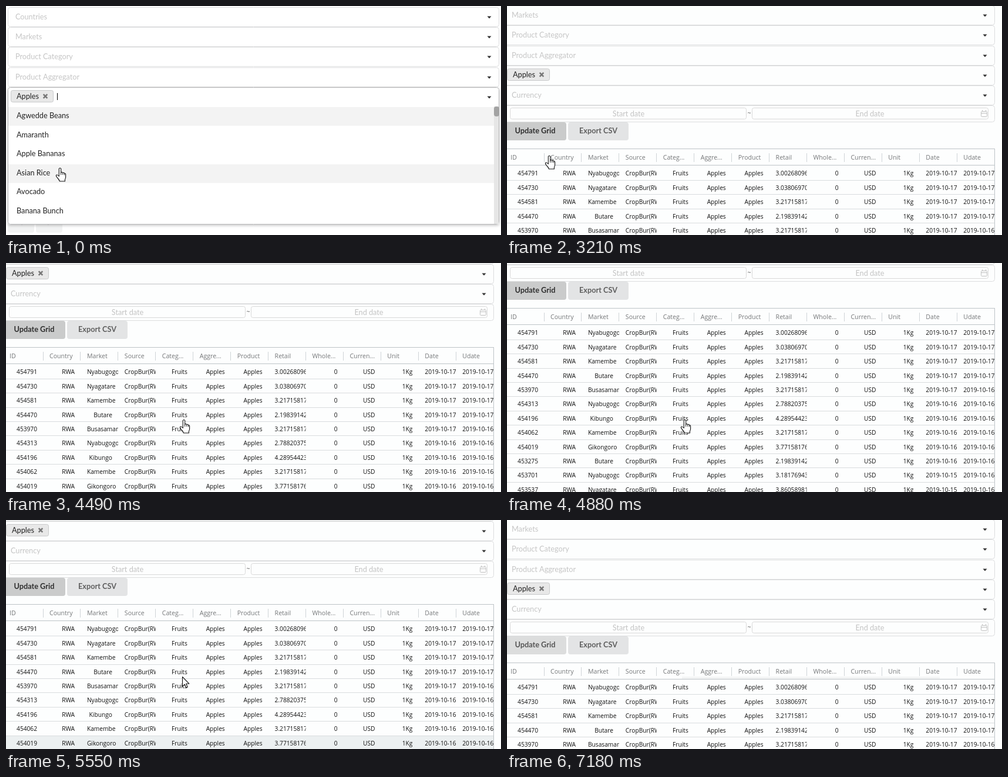
These frames come from a looping animation (843 px wide and 392 px high, 7280 ms). An HTML page with a canvas:

```html
<!DOCTYPE html>
<html lang="en">
<head>
<meta charset="utf-8">
<title>Price grid</title>
<style>
  html, body { margin: 0; width: 100%; height: 100%; overflow: hidden; background: #fff; }
  canvas { display: block; }
</style>
</head>
<body>
<canvas id="stage" width="843" height="392"></canvas>
<script>
const ctx = document.getElementById('stage').getContext('2d');
const LOOP = 7280;
const OPEN_END = 1080, LOADED = 3210;

const TICKS = [0, 150, 300, 420, 540, 660, 800, 920, 1080, 1200, 1320, 1460, 1580, 1700,
  3210, 3330, 3450, 3600, 3720, 3840, 3960, 4080, 4360, 4490, 4760, 4880, 5030,
  5310, 5430, 5550, 5830, 5980, 6380, 6530, 6650, 6770, 7180];

const POINTER = [[0, 92, 277], [150, 91, 276], [660, 234, 378], [920, 224, 377], [1080, 220, 377],
  [1320, 146, 330], [1700, 62, 255], [3209, 62, 255], [3210, 72, 256], [3450, 79, 256],
  [4080, 303, 268], [5030, 303, 268], [5310, 300, 268], [5980, 300, 268], [6380, 303, 268]];
const SCROLL = [[4240, 0], [4490, 100], [4640, 100], [5030, 200],
  [5310, 200], [5550, 100], [5700, 100], [5980, 0]];

const LATO = '12.7px Lato, sans-serif';
const LATO_BOLD = 'bold 12.7px Lato, sans-serif';
const CELL = '10.2px "Open Sans", sans-serif';
const HEAD = '10.6px "Open Sans", sans-serif';

const FIELDS = ['Countries', 'Markets', 'Product Category', 'Product Aggregator', '', 'Currency'];
const OPTIONS = ['Agwedde Beans', 'Amaranth', 'Apple Bananas', 'Asian Rice', 'Avocado', 'Banana Bunch'];
const COLUMNS = ['ID', 'Country', 'Market', 'Source', 'Categ...', 'Aggre...', 'Product',
  'Retail', 'Whole...', 'Curren...', 'Unit', 'Date', 'Udate'];
// id, market, retail price, day of date, day of update
const ROWS = [
  ['454791', 'Nyabugogo', '3.00268096', 17, 17],
  ['454730', 'Nyagatare', '3.03806970', 17, 17],
  ['454581', 'Kamembe', '3.21715817', 17, 17],
  ['454470', 'Butare', '2.19839142', 17, 17],
  ['453970', 'Busasamana', '3.21715817', 17, 16],
  ['454313', 'Nyabugogo', '2.78820375', 16, 16],
  ['454196', 'Kibungo', '4.28954423', 16, 16],
  ['454062', 'Kamembe', '3.21715817', 16, 16],
  ['454019', 'Gikongoro', '3.77158176', 16, 16],
  ['453275', 'Butare', '2.19839142', 16, 16],
  ['453701', 'Nyabugogo', '3.18176943', 15, 16],
  ['453537', 'Nyagatare', '3.86058981', 15, 16],
  ['453462', 'Kamembe', '3.21715817', 15, 16]
];
const ROWS_TOP = 311.4, ROW_HEIGHT = 24.4;

const HAND = new Path2D('M-1.7 14.5V1.6Q0 -1 1.7 1.6V8Q3.6 6.6 4.8 8.6Q6.8 7.6 7.6 9.6' +
  'Q9.6 9.2 9.6 11.6V16Q9.4 18.6 8.4 20V23H-.6Q-1.6 20 -4.6 17Q-8 13 -5.8 12Q-4.2 11.6 -1.7 14.5Z');
const HAND_FOLDS = new Path2D('M1.7 8V12M4.8 8.8V12M7.6 10V12.5');
const ARROW = new Path2D('M.5 .5V17L4.3 13.3L6.6 19L9.2 18L6.8 12.2H11.8Z');

function valueAt(keys, t) {
  if (t <= keys[0][0]) return keys[0].slice(1);
  for (let i = 1; i < keys.length; i++) {
    const [a, b] = [keys[i - 1], keys[i]];
    if (t > b[0]) continue;
    const u = (t - a[0]) / (b[0] - a[0]), ease = u * u * (3 - 2 * u);
    return a.slice(1).map((v, k) => Math.round(v + (b[k + 1] - v) * ease));
  }
  return keys[keys.length - 1].slice(1);
}

function rect(x, y, w, h, color) {
  ctx.fillStyle = color;
  ctx.fillRect(x, y, w, h);
}

function box(left, top, right, bottom, radius, fill, stroke) {
  ctx.beginPath();
  const inset = stroke ? 0.5 : 0;
  ctx.roundRect(left + inset, top + inset, right - left - 2 * inset, bottom - top - 2 * inset, radius);
  if (fill) { ctx.fillStyle = fill; ctx.fill(); }
  if (stroke) { ctx.strokeStyle = stroke; ctx.lineWidth = 1; ctx.stroke(); }
}

function text(str, x, y, font, color, align = 'left') {
  ctx.font = font;
  ctx.fillStyle = color;
  ctx.textAlign = align;
  ctx.fillText(str, x, y);
}

function strokePath(path, color, width) {
  ctx.strokeStyle = color;
  ctx.lineWidth = width;
  ctx.stroke(path);
}

function caretDown(x, y) {
  ctx.fillStyle = '#333';
  ctx.fill(new Path2D(`M${x - 3.5} ${y - 2}H${x + 3.5}L${x} ${y + 2}Z`));
}

function drawTag() {
  box(8, 144, 81, 165, 3, '#e8e8e8', '#c9cacb');
  text('Apples', 18, 159, LATO, '#222');
  strokePath(new Path2D('M63.7 151.2L70.3 157.8M70.3 151.2L63.7 157.8'), '#777', 2.5);
}

function drawFields(right) {
  FIELDS.forEach((label, i) => {
    const y = Math.round(2 + 34.2 * i);
    box(3, y, right, y + 34, 4, null, '#dcddde');
    text(label, 16, y + 21, LATO, '#c6c6c6');
    caretDown(right - 17, y + 17.5);
  });
  drawTag();

  box(3, 207, right, 236, 4, null, '#dcddde');
  box(13, 211, right - 423, 231, 3, null, '#d9d9d9');
  box(right - 414, 211, right - 11, 231, 3, null, '#d9d9d9');
  text('Start date', 215, 226, LATO, '#c3c3c3', 'center');
  text('~', right - 418.5, 224, HEAD, '#666', 'center');
  text('End date', right - 213, 226, LATO, '#c3c3c3', 'center');
  const x = right - 24;
  box(x, 217, x + 11, 227, 1, null, '#c0c0c0');
  rect(x + 1, 220, 9, 1, '#c0c0c0');
  rect(x + 2, 215, 1, 3, '#c0c0c0');
  rect(x + 8, 215, 1, 3, '#c0c0c0');
}

function button(label, left, right, fill, color) {
  box(left, 236, right, 267, 4, fill);
  text(label, (left + right) / 2, 255, LATO_BOLD, color, 'center');
}

function drawPager() {
  ['<', '>'].forEach((sign, i) => {
    const x = 3 + 48 * i;
    box(x, 356, x + 45, 388, 4, '#f2f3f3');
    text(sign, x + 22.5, 376, 'bold 11px Lato, sans-serif', '#aaa', 'center');
  });
}

function columnLeft(i) {
  return i ? 82 + 63.93 * (i - 1) : 14;
}

function drawHeader(right, fill) {
  rect(3, 281, right - 3, 29, fill);
  rect(3, 281, right - 3, 1, '#bdc3c7');
  rect(3, 309, right - 3, 1, '#bdc3c7');
  COLUMNS.forEach((name, i) => {
    text(name, columnLeft(i), 300, HEAD, '#757779');
    rect(Math.round(columnLeft(i + 1) - 11.5), 289, 1, 15, '#cfd4d7');
  });
}

function drawEmptyGrid(right) {
  box(3, 281, right, 356, 0, '#fff', '#bdc3c7');
  drawHeader(right, '#f4f6f6');
  text('No Rows To Show', 421.5, 337, CELL, '#000', 'center');
}

function drawCell(str, column, baseline) {
  const left = columnLeft(column);
  ctx.save();
  ctx.beginPath();
  ctx.rect(left, baseline - 14, 53, 20);
  ctx.clip();
  ctx.font = CELL;
  const edge = column ? left + 43 : 61;
  text(str, Math.max(left, edge - ctx.measureText(str).width), baseline, CELL, '#111');
  ctx.restore();
}

function drawRows(right, hovered) {
  ROWS.forEach(([id, market, retail, day, updated], i) => {
    const top = Math.round(ROWS_TOP + ROW_HEIGHT * i);
    const bottom = Math.round(ROWS_TOP + ROW_HEIGHT * (i + 1));
    if (i === hovered) rect(3, top, right - 3, bottom - top, '#ecf0f1');
    rect(3, bottom - 1, right - 3, 1, '#d9dcde');
    [id, 'RWA', market, 'CropBur(RWA)', 'Fruits', 'Apples', 'Apples', retail, '0', 'USD', '1Kg',
      '2019-10-' + day, '2019-10-' + updated].forEach((cell, c) => drawCell(cell, c, top + 16));
  });
  rect(right - 1, 281, 1, 400, '#bdc3c7');
}

function drawDropdown(caretOn) {
  ctx.save();
  ctx.shadowColor = 'rgba(34,36,38,.25)';
  ctx.shadowBlur = 4;
  ctx.shadowOffsetY = 2;
  box(3, 139, 840, 374, 4, '#fff');
  ctx.restore();
  box(3, 139, 840, 374, 4, '#fff', '#b9babb');
  caretDown(823, 156.5);
  drawTag();
  if (caretOn) rect(87, 149, 1, 12, '#000');
  OPTIONS.forEach((label, i) => {
    const top = Math.round(173 + 32.6 * i);
    if (i === 0 || i === 3) rect(4, top, 827, 32, '#f3f3f3');
    text(label, 18, top + 19, LATO, '#222');
  });
  rect(831, 172, 8, 201, '#e6e6e6');
  box(831, 172, 840, 189, 4, '#a3a3a3');
}

function drawPointer(t) {
  if (t >= 6530) return;
  const [x, y] = valueAt(POINTER, t);
  const arrow = (t >= 660 && t < 1580) || (t >= 5310 && t < 6380);
  const shape = arrow ? ARROW : HAND;
  ctx.save();
  ctx.translate(x, y);
  ctx.lineJoin = 'round';
  ctx.fillStyle = '#fff';
  ctx.fill(shape);
  strokePath(shape, '#111', 1.1);
  if (!arrow) strokePath(HAND_FOLDS, '#111', 1);
  ctx.restore();
}

function updateColors(t) {
  if (t < 1580) return ['#e0e1e2', '#666'];
  return t < 7180 ? ['#cacbcb', '#2f2f2f'] : ['#dcdddd', '#555'];
}

function draw(t) {
  const loaded = t >= LOADED;
  const right = loaded ? 839 : 840;
  const page = loaded ? '#fdfefe' : '#fff';
  rect(0, 0, 843, 392, page);
  ctx.save();
  if (loaded) ctx.translate(-8, -37 - valueAt(SCROLL, t)[0]);
  drawFields(right);
  button('Update Grid', 3, 109, ...updateColors(t));
  if (loaded) {
    button('Export CSV', 112, 215, '#e3e4e5', '#5f5f5f');
    drawHeader(right, page);
    drawRows(right, t >= 5310 && t < 5980 ? 8 : -1);
  } else {
    drawEmptyGrid(right);
    drawPager();
    if (t < OPEN_END) drawDropdown(t < 420 || t >= 920);
  }
  ctx.restore();
  if (t >= 6530) rect(298, 268, 439, 4, '#f4f5f5');
  drawPointer(t);
}

function frame() {
  const now = performance.now() % LOOP;
  draw(TICKS.findLast(tick => tick <= now));
  requestAnimationFrame(frame);
}
frame();
</script>
</body>
</html>
```
